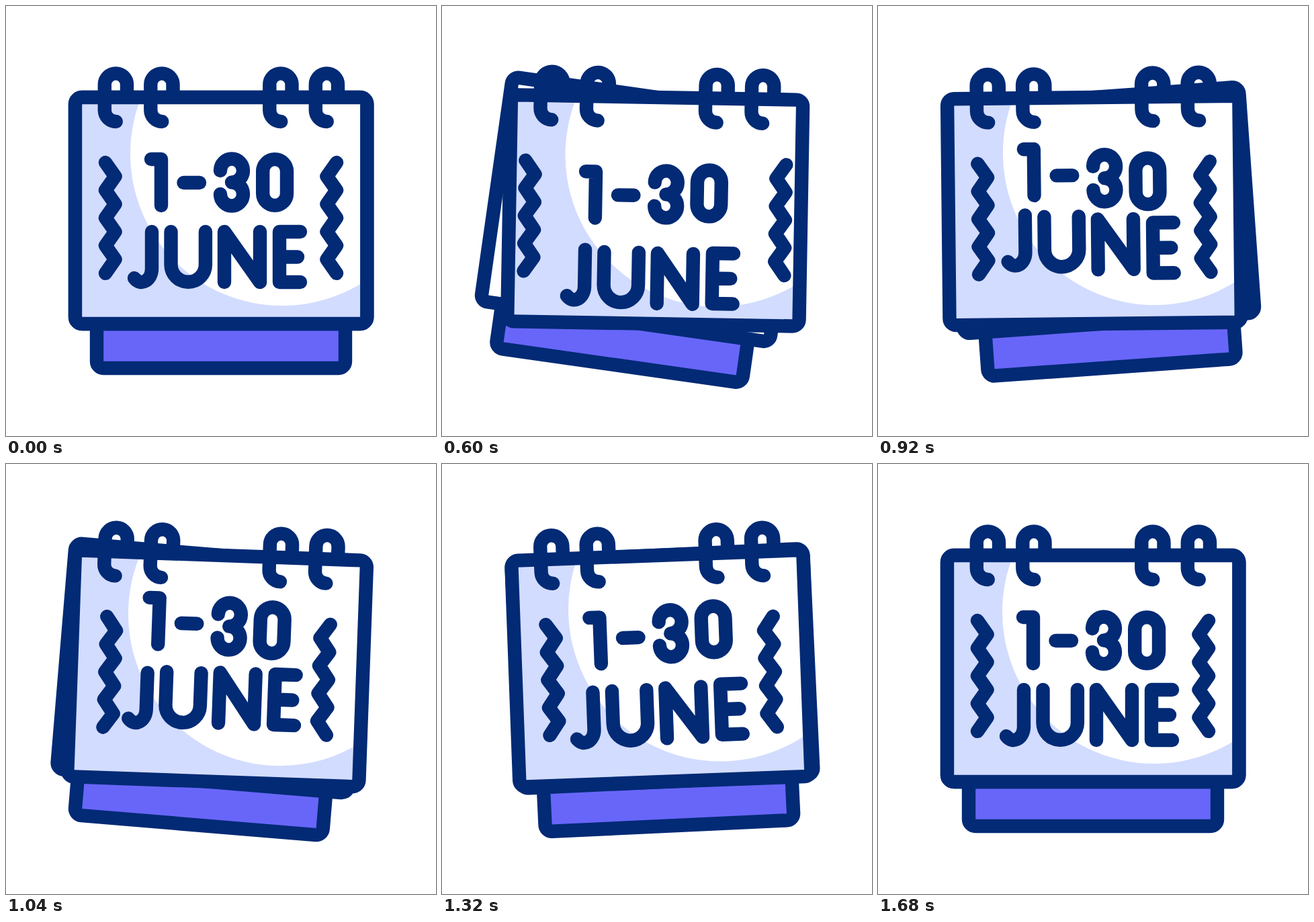
An HTML page for the animation above (2000 ms loop, 640x640 px).

```html
<!DOCTYPE html>
<html lang="en">
<head>
<meta charset="utf-8">
<title>1-30 June</title>
<style>
  html, body { margin: 0; height: 100%; overflow: hidden; background: #fff; }
  svg { display: block; width: 100vw; height: 100vh; }
  .line { fill: none; stroke: #022a75; stroke-width: 20.4; stroke-linecap: round; stroke-linejoin: round; }
</style>
</head>
<body>
<svg viewBox="0 0 640 640" role="img" aria-label="1-30 June">
  <defs>
    <rect id="sheet" x="103" y="136" width="434.3" height="337" rx="10"/>
    <path id="ring" d="M180 132V117a16.6 16.6 0 0 0-33.2 0V155a17 17 0 0 0 17 17"/>
    <clipPath id="inside"><use href="#sheet"/></clipPath>
  </defs>
  <g id="back" class="line">
    <rect x="135" y="460" width="370" height="79" rx="10" fill="#6866f9"/>
    <use href="#sheet" fill="#fff"/>
  </g>
  <g id="front">
    <use href="#sheet" fill="#d2dcfe"/>
    <circle cx="411" cy="220" r="226" fill="#fff" clip-path="url(#inside)"/>
    <g class="line">
      <use href="#sheet"/>
      <use href="#ring"/>
      <use href="#ring" x="68.5"/>
      <use href="#ring" x="245.5"/>
      <use href="#ring" x="314"/>
      <g id="marks"></g>
    </g>
  </g>
</svg>
<script>
const LOOP = 2000, FRAME = 40, STAGGER = 35;
const byId = id => document.getElementById(id);

// Each track is a list of [time, value] keys, eased in and out between them.
const backTurn = [[250, 0], [526, 11.5], [812, -9], [1098, 6.4], [1384, -4], [1675, 0]];
const frontTurn = [[205, 0], [480, 4], [766, -3.9], [1055, 2.1], [1344, -2.2], [1640, 0]];
const digitBob = [[275, 0], [600, 20], [1055, -25.5], [1390, 0]];
const letterBob = [[200, 0], [540, 32], [940, -26], [1320, 0]];
const spread = [[195, 0], [600, 22], [1070, -6], [1540, 0]];

const digits = [
  'M216 228H231V297',
  'M264.5 263H288',
  'M319 245a17 17.5 0 1 1 17 17.5a17 17.5 0 1 1-17 17.5',
  'M382.2 246a17.9 17.9 0 0 1 35.8 0V279a17.9 17.9 0 0 1-35.8 0Z'
];
const letters = [
  'M217 336V391C217 408 201 418 191 405',
  'M245.5 336V385a25.7 25.7 0 0 0 51.4 0V336',
  'M325 411V336L378 411V336',
  'M438 336H407V411H438M407 373.5H434'
];

function zigzag(x, step) {
  const points = Array.from({ length: 9 }, (_, i) => `${x + (i % 2) * step} ${233 + i * 20.6}`);
  return 'M' + points.join('L');
}

function addMark(d) {
  const path = document.createElementNS('http://www.w3.org/2000/svg', 'path');
  path.setAttribute('d', d);
  return byId('marks').appendChild(path);
}

function valueAt(keys, t) {
  const next = keys.findIndex(key => key[0] > t);
  if (next < 1) return 0;
  const [t0, a] = keys[next - 1], [t1, b] = keys[next];
  const x = (t - t0) / (t1 - t0);
  return a + (b - a) * x * x * (3 - 2 * x);
}

const words = [[digits.map(addMark), digitBob], [letters.map(addMark), letterBob]];
const left = addMark(zigzag(148, 14.5));
const right = addMark(zigzag(492, -14.5));

const move = (el, x, y) => el.setAttribute('transform', `translate(${x} ${y})`);
const turn = (id, angle) => byId(id).setAttribute('transform', `rotate(${angle} 320 136)`);

function draw(now) {
  const t = Math.floor(now % LOOP / FRAME) * FRAME;
  turn('back', valueAt(backTurn, t));
  turn('front', valueAt(frontTurn, t));
  for (const [glyphs, bob] of words)
    glyphs.forEach((glyph, i) => move(glyph, 0, valueAt(bob, t - i * STAGGER)));
  const gap = valueAt(spread, t);
  move(left, -gap, 0);
  move(right, gap, 0);
}

const start = performance.now();
function tick() {
  draw(performance.now() - start);
  requestAnimationFrame(tick);
}
tick();
</script>
</body>
</html>
```
